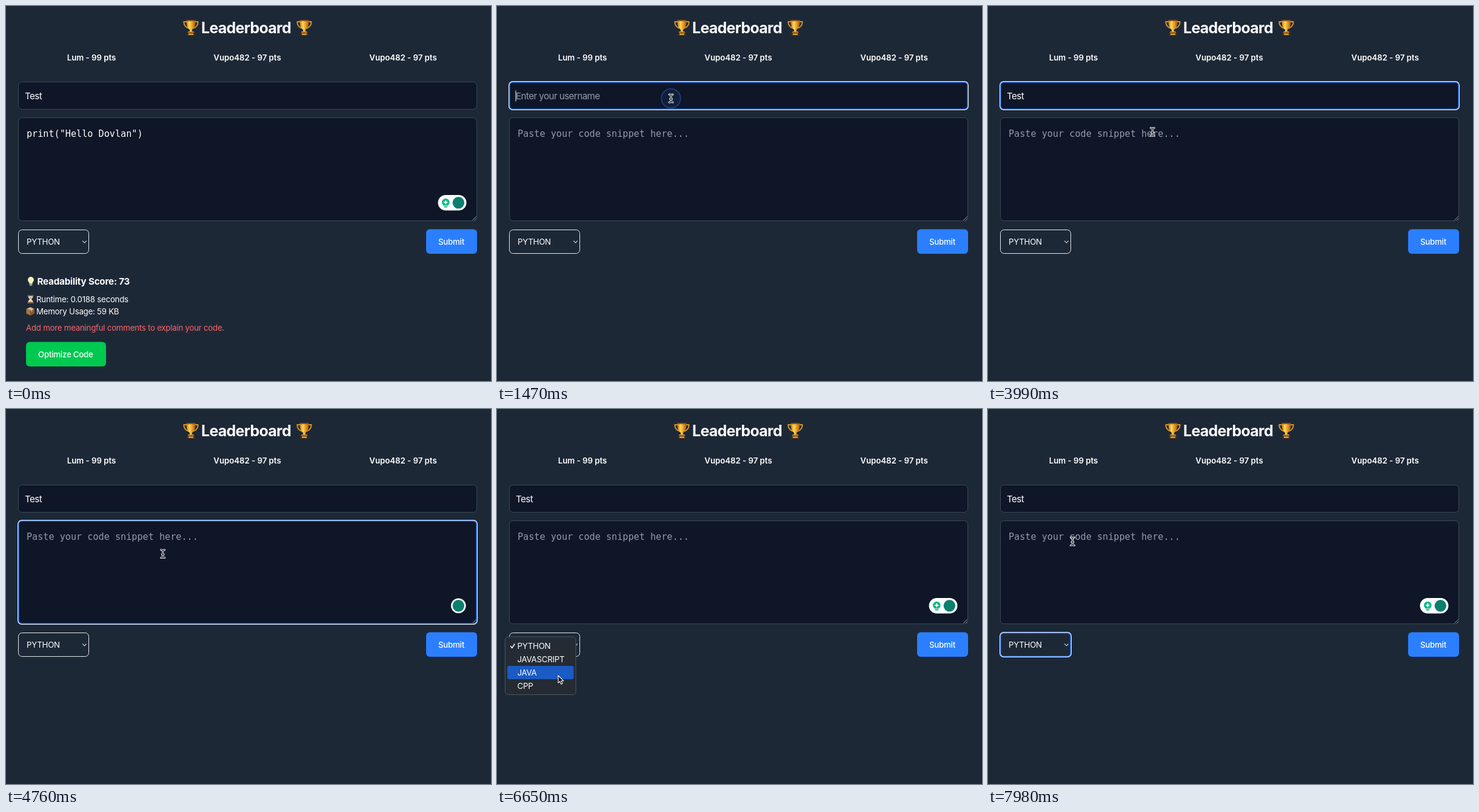
Write an HTML page that moves like this. It is 800x619 px and loops after 8000 ms.

```html
<!DOCTYPE html>
<html lang="en">
<head>
<meta charset="utf-8">
<title>Leaderboard</title>
<style>
  html, body { margin: 0; width: 100%; height: 100%; overflow: hidden; background: #1d2837; }
  svg { display: block; width: 100%; height: 100%; }
  text { font: 400 13.27px Inter, "Open Sans", sans-serif; letter-spacing: -.018em; fill: #fff; white-space: pre; }
  .title { font-size: 25px; font-weight: 700; letter-spacing: -.03em; }
  .points { font-weight: 600; letter-spacing: -.003em; text-anchor: middle; }
  .field { font-size: 15.17px; letter-spacing: -.037em; }
  .code { font: 15.17px "DejaVu Sans Mono", monospace; letter-spacing: 0; }
  .hint { fill: #949ba8; }
  .button { font-weight: 500; }
  .score { font-size: 15.17px; font-weight: 700; letter-spacing: -.012em; }
  .box { fill: #0e1628; stroke: #3d4857; }
  .line { fill: none; stroke-linecap: round; stroke-linejoin: round; }
</style>
</head>
<body>
<svg viewBox="0 0 800 619" xmlns="http://www.w3.org/2000/svg">
  <defs>
    <linearGradient id="gold">
      <stop offset="0" stop-color="#c57b14"/>
      <stop offset=".35" stop-color="#ffd75a"/>
      <stop offset=".6" stop-color="#eba52a"/>
      <stop offset="1" stop-color="#a9600d"/>
    </linearGradient>
    <g id="trophy">
      <path class="line" stroke="#d99422" stroke-width="1.9" d="M6 3H1.3C1.3 9 4 12 9 13.5M20 3h4.7C24.7 9 22 12 17 13.5"/>
      <path fill="url(#gold)" d="M5.5 .5h15c0 8-1.5 13-5.5 15.5v4h-4v-4C7 13.5 5.5 8.5 5.5 .5z"/>
      <path fill="#8a4f12" d="M5.5 .5h15v1.5h-15z"/>
      <path fill="#d08b20" d="M8.5 19h9l1 2.5h-11z"/>
      <path fill="#4a2c1b" d="M6.5 21h13v5h-13z"/>
      <path fill="#e3ad45" d="M9 22.3h8v2.4H9z"/>
    </g>
  </defs>
  <rect width="800" height="619" fill="#1d2837"/>

  <use href="#trophy" x="292" y="23"/>
  <text class="title" x="322" y="45">Leaderboard</text>
  <use href="#trophy" x="479" y="23"/>
  <text class="points" x="141" y="90">Lum - 99 pts</text>
  <text class="points" x="398" y="90">Vupo482 - 97 pts</text>
  <text class="points" x="655" y="90">Vupo482 - 97 pts</text>

  <rect class="box" x="20.5" y="125.5" width="756" height="45" rx="6"/>
  <rect class="box" x="20.5" y="184.5" width="756" height="170" rx="6"/>
  <path class="line" stroke="#a3a9b2" stroke-width=".9" d="M769.5 353.5l6-6M773 353.5l2.5-2.5"/>
  <rect x="20.5" y="369.5" width="116" height="39" rx="6" fill="#1d2837" stroke="#e4e7eb"/>
  <text x="34" y="394">PYTHON</text>
  <path class="line" stroke="#d6dae0" stroke-width="1.1" d="M126.5 387.8l3 3 3-3"/>
  <rect x="693" y="368.5" width="84" height="40.5" rx="6" fill="#2b7fff"/>
  <text class="button" x="713" y="394">Submit</text>

  <g id="ring">
    <rect class="line ringEdge" stroke="#1763d6" stroke-width="2"/>
    <rect class="line ringEdge" stroke="#e8f0fb" stroke-width="1.2"/>
  </g>

  <text id="name" class="field" x="31" y="153.5"></text>
  <text id="nameHint" class="field hint" x="31" y="153.5">Enter your username</text>
  <text id="code" class="code" x="34" y="215.8">print("Hello Dovlan")</text>
  <text id="codeHint" class="code hint" x="34" y="215.8">Paste your code snippet here...</text>
  <rect id="caret" width="1" height="18" fill="#fff"/>

  <g id="pill">
    <rect x="712.5" y="312" width="47" height="25.5" rx="12.7" fill="#fff"/>
    <path fill="#12b886" d="M719 324a6.3 6.3 0 1 1 12.6 0c0 3-2 4-2.8 5.5h-7c-.8-1.5-2.8-2.5-2.8-5.5zM722.5 330.5h5.6v2h-5.6z"/>
    <path fill="#fff" d="M725.3 320l1.2 2.8 2.8 1.2-2.8 1.2-1.2 2.8-1.2-2.8-2.8-1.2 2.8-1.2z"/>
  </g>
  <circle id="badge" cx="746.3" cy="324.8" r="11" fill="#0b7f6e" stroke="#fff" stroke-width="2.6"/>

  <g id="results">
    <path fill="#f7eebc" d="M36 452a5 5 0 1 1 10 0c0 3-2.2 3.5-2.5 6h-5c-.3-2.5-2.5-3-2.5-6z"/>
    <path fill="#9b9fa5" d="M38.5 458h5v2.5l-1.5 1.5h-2l-1.5-1.5z"/>
    <text class="score" x="51.5" y="460">Readability Score: 73</text>
    <path fill="#d7e2e8" d="M36.5 478.5h8c0 3-1 4-3 5.5 2 1.5 3 2.5 3 5.5h-8c0-3 1-4 3-5.5-2-1.5-3-2.5-3-5.5z"/>
    <path fill="#d9a04c" d="M37.8 480.5h5.4L40.5 484zM37 489.5q3.5-5 7 0z"/>
    <path fill="#94532f" d="M35.5 477h10v2h-10zM35.5 489h10v2h-10z"/>
    <text x="50" y="488.7">Runtime: 0.0188 seconds</text>
    <path fill="#c99a63" d="M33.5 500l7-3 6.5 3-6.5 3z"/>
    <path fill="#a87643" d="M33.5 500l7 3v8l-7-3.5z"/>
    <path fill="#84572f" d="M47 500l-6.5 3v8l6.5-3.5z"/>
    <path fill="#e2c193" d="M36.5 498.7l2-.9 6.7 3-2 .9v3l-1.2.5v-3z"/>
    <text x="50" y="509">Memory Usage: 59 KB</text>
    <text x="33" y="536" style="fill:#ff6467">Add more meaningful comments to explain your code.</text>
    <rect x="33" y="554.5" width="132" height="40.5" rx="6" fill="#00c950"/>
    <text class="button" x="53" y="580">Optimize Code</text>
  </g>

  <g id="menu">
    <rect x="13.5" y="376" width="116.5" height="95.5" rx="5" fill="#242b33" stroke="#4d555f"/>
    <rect id="hover" x="17" width="109.5" height="22" rx="3" fill="#1a5bc4"/>
    <path class="line" stroke="#fff" stroke-width="1.4" d="M22.5 391.5l2.3 3 4.2-6.5"/>
    <g id="options"></g>
  </g>

  <circle id="press" r="15.8" fill="#2b6fd6" fill-opacity=".1" stroke="#2b6fd6" stroke-opacity=".4" stroke-width="2"/>
  <g id="pointer">
    <path id="arrow" fill="#08090b" stroke="#fff" stroke-width="1.1" stroke-linejoin="round" d="M0 0v12.2l2.8-2.6 2 4.6 2.2-1-2-4.4h3.9z"/>
    <g id="beam" class="line">
      <path stroke="#fff" stroke-width="3" d="M-3-6.5q3 0 3 2 0-2 3-2M0-4.5v9M-3 6.5q3 0 3-2 0 2 3 2M-1.5 1h3"/>
      <path stroke="#10151f" stroke-width="1.1" d="M-3-6.5q3 0 3 2 0-2 3-2M0-4.5v9M-3 6.5q3 0 3-2 0 2 3 2M-1.5 1h3"/>
    </g>
  </g>
</svg>
<script>
const LOOP = 8000, STEP = 70;
const $ = id => document.getElementById(id);
const show = (id, on) => $(id).style.display = on ? '' : 'none';
const set = (el, attrs) => Object.entries(attrs).forEach(([k, v]) => el.setAttribute(k, v));
const clamp = (v, lo, hi) => v < lo ? lo : v > hi ? hi : v;

const RELOAD = 70, NAME_CLICK = 1400, CODE_CLICK = 4120, MENU_OPEN = 5390, MENU_CLOSE = 7280;
const BADGE_IN = 4480, PILL_IN = 5040;
const KEYS = [2730, 2870, 3010, 3220];
const CLICKS = [NAME_CLICK, CODE_CLICK, MENU_OPEN, MENU_CLOSE];
const ROW_TOP = 380, ROW = 22;

// time, x, y
const PATH = [
  [140, 92, -20], [1190, 287, 152.5], [3640, 287, 152.5], [4200, 264, 233.5],
  [4690, 264, 233.5], [5320, 110, 391], [5950, 108.5, 391], [6650, 101, 440],
  [6720, 101, 441], [7140, 107, 391], [7210, 107, 391], [7980, 139.5, 218.5]
];

const RINGS = {
  name: { x: 20, y: 125, width: 757, height: 46 },
  code: { x: 20, y: 184, width: 757, height: 171 },
  select: { x: 20, y: 369, width: 117, height: 40 }
};

$('options').innerHTML = ['PYTHON', 'JAVASCRIPT', 'JAVA', 'CPP']
  .map((label, i) => `<text x="33.5" y="${395.7 + i * ROW}">${label}</text>`).join('');

function pointerAt(t) {
  const next = PATH.findIndex(p => p[0] > t);
  if (next < 0) return PATH[PATH.length - 1].slice(1);
  if (next === 0) return PATH[0].slice(1);
  const [t0, x0, y0] = PATH[next - 1], [t1, x1, y1] = PATH[next];
  const u = (t - t0) / (t1 - t0), e = u * u * (3 - 2 * u);
  return [x0 + (x1 - x0) * e, y0 + (y1 - y0) * e];
}

function focusAt(t) {
  if (t >= MENU_CLOSE) return 'select';
  if (t >= MENU_OPEN) return null;
  if (t >= CODE_CLICK) return 'code';
  return t >= NAME_CLICK ? 'name' : null;
}

function drawFields(t, focus) {
  const loaded = t >= RELOAD;
  const typed = KEYS.filter(k => t >= k).length;
  const name = loaded ? 'Test'.slice(0, typed) : 'Test';
  $('name').textContent = name;
  show('nameHint', !name);
  show('code', !loaded);
  show('codeHint', loaded);
  show('results', !loaded);
  show('pill', !loaded || t >= PILL_IN);
  show('badge', !loaded || t >= BADGE_IN);

  show('ring', focus);
  if (focus) {
    const r = RINGS[focus];
    document.querySelectorAll('.ringEdge').forEach((edge, i) => {
      const d = i ? 0.4 : -0.8;
      set(edge, { x: r.x - d, y: r.y - d, width: r.width + 2 * d, height: r.height + 2 * d, rx: 6 + d });
    });
  }

  const inName = focus === 'name';
  const since = inName ? [NAME_CLICK, ...KEYS].filter(k => t >= k).pop() : CODE_CLICK;
  show('caret', (inName || focus === 'code') && Math.floor((t - since) / 500) % 2 === 0);
  const width = inName && name ? $('name').getComputedTextLength() : 0;
  set($('caret'), inName ? { x: 30.5 + width, y: 139.5 } : { x: 33.5, y: 202 });
}

function drawPointer(t) {
  const [x, y] = pointerAt(t);
  const menu = t >= MENU_OPEN && t < MENU_CLOSE;
  show('menu', menu);
  set($('hover'), { y: ROW_TOP + ROW * clamp(Math.floor((y - ROW_TOP) / ROW), 0, 3) });

  const overText = !menu && ((y > 126 && y < 171) || (y > 185 && y < 354));
  show('pointer', t >= PATH[0][0] && (t < KEYS[0] || t >= 3710));
  show('arrow', !overText);
  show('beam', overText);
  set($('pointer'), { transform: `translate(${x} ${y})` });

  const click = CLICKS.find(c => t >= c && t < c + 350);
  show('press', click !== undefined);
  if (click !== undefined) set($('press'), { cx: x, cy: y, opacity: clamp(1.2 - (t - click) / 350, 0, 1) });
}

function draw(ms) {
  const t = Math.floor((ms % LOOP) / STEP) * STEP;
  drawFields(t, focusAt(t));
  drawPointer(t);
}

const start = performance.now();
function tick() {
  draw(performance.now() - start);
  requestAnimationFrame(tick);
}
tick();
</script>
</body>
</html>
```
